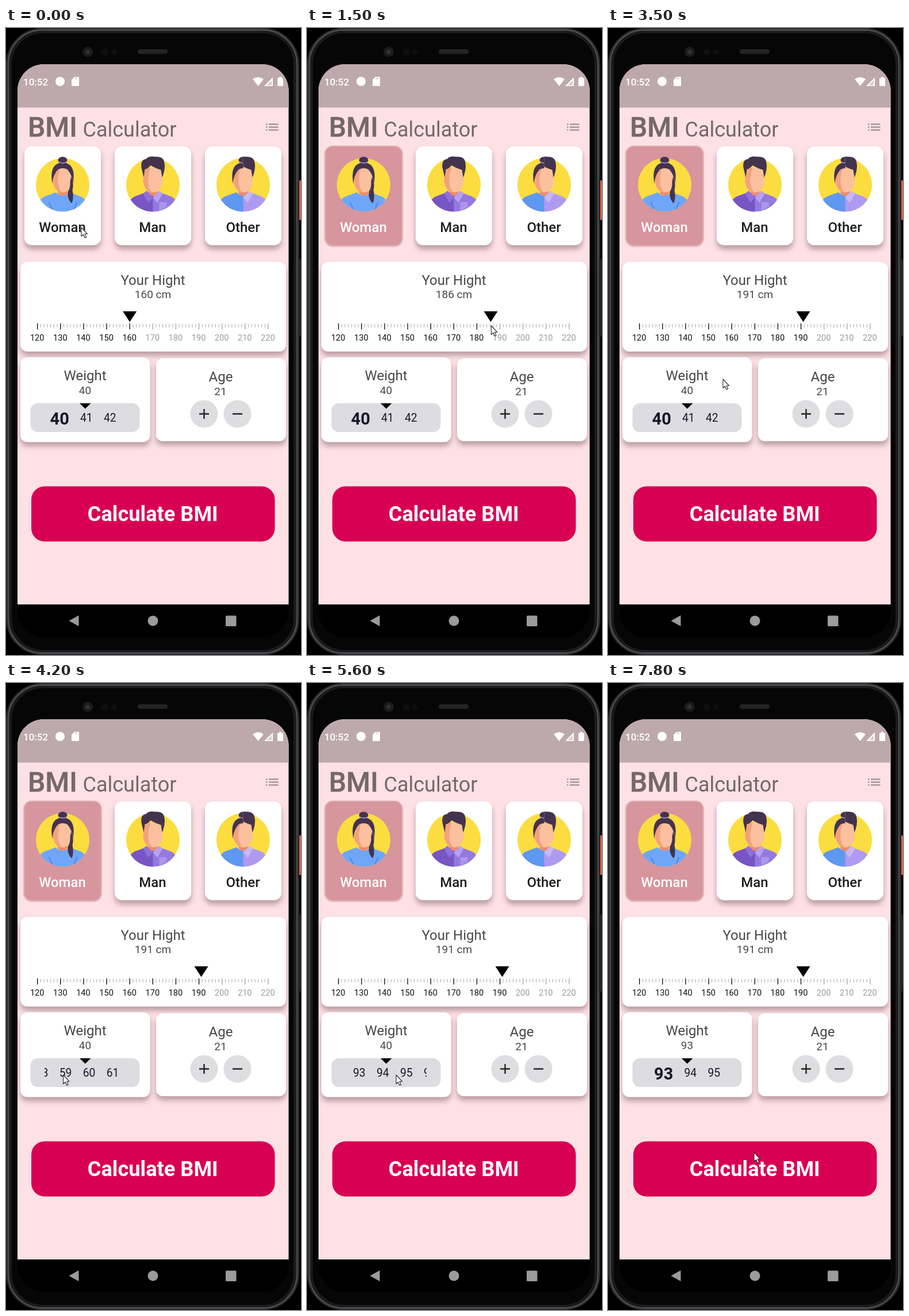
Recreate the animation shown at these times as an HTML page. Size 513 by 1091 pixels, loop 8 s.

```html
<!DOCTYPE html>
<html lang="en">
<head>
<meta charset="utf-8">
<title>BMI Calculator</title>
<style>
  html, body { margin: 0; width: 513px; height: 1091px; overflow: hidden; background: #000; }
  svg { display: block; font-family: Roboto, sans-serif; }
  .mid { text-anchor: middle; }
  .card { fill: #fff; filter: drop-shadow(0 7px 5px rgba(70, 35, 45, .36)); }
  .card.on { fill: #d7959d; stroke: #dda3aa; stroke-width: 2; filter: drop-shadow(0 1px 1.5px rgba(75, 35, 45, .35)); }
  .name { font-size: 24px; font-weight: 500; fill: #1e1e1e; }
  .name.on { fill: #fff; }
  .head { font-size: 24px; fill: #484848; }
  .num { font-size: 19px; fill: #484848; }
  .axis { font-size: 14.6px; }
  .item { font-size: 19.3px; fill: #16172a; }
  .item.on { font-size: 29px; font-weight: 700; }
</style>
</head>
<body>
<svg width="513" height="1091" viewBox="0 0 513 1091">
  <defs>
    <clipPath id="disc"><circle r="46.5"/></clipPath>
    <clipPath id="left"><rect x="-47" y="-55" width="47" height="110"/></clipPath>
    <clipPath id="right"><rect y="-55" width="47" height="110"/></clipPath>
    <clipPath id="list"><rect x="67" y="653" width="141" height="50"/></clipPath>
    <clipPath id="screen"><rect x="20" y="63" width="471.5" height="997" rx="46"/></clipPath>

    <path id="shirt" clip-path="url(#disc)" d="M-47 50Q-44 25-31 20L-12 13Q0 24 12 13L31 20Q44 25 47 50Z"/>
    <g id="face">
      <path d="M-8 4V15Q0 23 8 15V4Z" fill="#ed8c6c"/>
      <path d="M-16-22Q0-40 16-22L17-5Q14 10 3 13H-3Q-14 10-17-5Z" fill="#fbc09d"/>
      <path d="M-16-22Q-11-30-4-30Q-9-16-8-4Q-7 8-1 13H-3Q-14 10-17-5Z" fill="#f3a17f"/>
    </g>
    <g id="womanHair" fill="#43334f">
      <ellipse cy="-43" rx="8" ry="6"/>
      <path d="M-18-2Q-24-38 0-39Q24-38 18-2Q17-17 8-27Q0-31-8-27Q-17-17-18-2Z"/>
      <path d="M-7-40Q0-36 7-40" stroke="#9d83d5" stroke-width="2"/>
    </g>
    <path id="manHair" fill="#43334f" d="M-16-13L-20-30Q-22-44-12-45Q-8-51 4-49Q19-50 20-38Q22-26 16-13L14-26Q4-29-4-34Q-9-28-14-27Z"/>
    <path id="collar" d="M11 10L0 22L8 31L17 15Z"/>

    <g id="woman">
      <use href="#shirt" fill="#6fa6fa"/>
      <path d="M-24 30L-18 42M25 30L20 42" stroke="#4a7fda" stroke-width="1.5"/>
      <use href="#face"/><use href="#womanHair"/>
      <path d="M15-15Q20 0 17 9Q20 22 16 32Q8 26 9 12Q14 4 13-6Z" fill="#43334f"/>
    </g>
    <g id="man">
      <use href="#shirt" fill="#9479df"/><use href="#shirt" fill="#7855c4" clip-path="url(#left)"/>
      <path d="M11 30H24V38L11 45Z" fill="#ac96ed"/>
      <use href="#face"/><use href="#manHair"/>
      <use href="#collar" fill="#b7a1f1"/><use href="#collar" fill="#8e70da" transform="scale(-1 1)"/>
    </g>
    <g id="other">
      <use href="#shirt" fill="#b09af0"/><use href="#shirt" fill="#5f98f0" clip-path="url(#left)"/>
      <use href="#face"/><use href="#collar" fill="#c7b8f6"/>
      <use href="#womanHair" clip-path="url(#left)"/><use href="#manHair" clip-path="url(#right)"/>
    </g>
  </defs>

  <!-- phone body -->
  <rect x="505" y="265" width="8" height="69" rx="1.5" fill="#dd604c"/>
  <rect x="505" y="402" width="8" height="135" rx="2" fill="#202022"/>
  <rect x="1" y="1" width="508" height="1089" rx="62" fill="#161617" stroke="#29292b" stroke-width="2"/>
  <rect x="4" y="3.5" width="502" height="1084" rx="59" fill="#060606" stroke="#4b4b4f" stroke-width="3"/>
  <rect x="8" y="7" width="494" height="1077" rx="56" fill="none" stroke="#1b1b1d" stroke-width="4"/>
  <rect x="229" y="37" width="52" height="8" rx="4" fill="#262324"/>
  <circle cx="142" cy="41.5" r="9" fill="#1b1b1d"/>
  <circle cx="142" cy="41.5" r="4" fill="#303035"/>
  <g fill="#0e0e0f"><circle cx="172" cy="42" r="6"/><circle cx="188" cy="42" r="5"/></g>

  <!-- screen -->
  <g clip-path="url(#screen)">
    <rect x="20" y="63" width="472" height="997"/>
    <rect x="20" y="63" width="472" height="940" fill="#fde1e5"/>
    <rect x="20" y="63" width="472" height="75.5" fill="#bda9ab"/>
  </g>
  <g fill="#fff">
    <text x="30" y="99.5" font-size="17" font-weight="500">10:52</text>
    <circle cx="94" cy="93" r="8"/>
    <path d="M119 85H126Q127 85 127 86V100Q127 101 126 101H115Q114 101 114 100V90Z"/>
    <path d="M429 89Q438.500 82 448 89L438.500 101Z"/>
    <path d="M464 86V101H449Z" fill-opacity=".4"/>
    <path d="M464 86V101H449ZM462 91L453.500 99.500H462Z" fill-rule="evenodd"/>
    <path d="M475 85H479V87H482V101H472V87H475Z"/>
  </g>
  <path d="M120 87.500H125" stroke="#bda9ab" stroke-width="3" stroke-dasharray="1 1.500"/>
  <g fill="#746869">
    <text x="38" y="188.7" font-size="48" font-weight="500" stroke="#746869" stroke-width=".5">BMI</text>
    <text x="133.500" y="188.7" font-size="36">Calculator</text>
  </g>
  <g id="menu" stroke="#93878a" stroke-width="2.2" stroke-dasharray="2.5 2.5 20"></g>

  <g id="people"></g>

  <rect class="card" x="25" y="407" width="462" height="156" rx="12"/>
  <text class="head mid" x="255.5" y="447">Your Hight</text>
  <text class="num mid" x="255.5" y="470.3" id="height"></text>
  <g id="scale"></g>
  <path id="pin" d="M-12 493H12L0 511.500Z"/>

  <rect class="card" x="25" y="573" width="225.5" height="147.5" rx="12"/>
  <text class="head mid" x="137.5" y="613.3">Weight</text>
  <text class="num mid" x="137.5" y="637.2" id="weight"></text>
  <rect x="42.5" y="653" width="190" height="50" rx="13" fill="#dddce0"/>
  <g id="items" clip-path="url(#list)"></g>
  <path d="M128 653H147.500L137.750 662.500Z"/>

  <rect class="card" x="261" y="574.5" width="226" height="144.5" rx="12"/>
  <text class="head mid" x="373.5" y="615.3">Age</text>
  <text class="num mid" x="373" y="639">21</text>
  <g fill="#dedde0"><circle cx="344.5" cy="671.5" r="24"/><circle cx="402.5" cy="671.5" r="24"/></g>
  <path d="M336 671.500H353M344.500 663V680M394 671.500H411" stroke="#232323" stroke-width="2.4"/>

  <rect x="44" y="797.5" width="423.5" height="96" rx="23" fill="#d80052"/>
  <text class="mid" x="255.2" y="858.3" font-size="36.2" font-weight="700" fill="#fff">Calculate BMI</text>

  <g fill="#9b9b9b">
    <path d="M109.500 1031.500L126.500 1022V1041Z"/>
    <circle cx="255.5" cy="1031.5" r="9"/>
    <rect x="382" y="1022.5" width="18.5" height="18.5" rx="1.5"/>
  </g>
  <path id="mouse" d="M0 0V15.500L3.500 12.300L6 18L8.600 16.900L6.100 11.300H10.600Z" fill="#fff" stroke="#25252c" stroke-width="1.1" stroke-linejoin="round"/>
</svg>
<script>
const $ = id => document.getElementById(id);
const STEP = 41, PICK = 7200;

function add(parent, tag, attrs, text = '') {
  const el = document.createElementNS('http://www.w3.org/2000/svg', tag);
  for (const k in attrs) el.setAttribute(k, attrs[k]);
  el.textContent = text;
  parent.appendChild(el);
  return el;
}

const scaleX = v => 54.7 + (v - 120) * 4.012;
const part = (t, from, to) => Math.min(1, Math.max(0, (t - from) / (to - from)));
const ease = (t, from, to) => { const p = part(t, from, to); return p * (2 - p); };

// The pointer drags the height, then flings the weight list twice.
const heightAt = t => Math.round(160 + 26 * ease(t, 1000, 1500) + 3 * ease(t, 1500, 1700)
  + 3 * ease(t, 2000, 2400) - ease(t, 2600, 2800));
const scrollAt = t => 1270.5 * ease(t, 3900, 4700) + 910.5 * ease(t, 4800, 5600);
const swipe = (t, from, to) => 60 * Math.sin(Math.PI * part(t, from, to));

function mouseAt(t) {
  let x = 131, y = 347;
  const go = (from, to, tx, ty) => {
    const p = ease(t, from, to);
    x += (tx - x) * p;
    y += (ty - y) * p;
  };
  go(400, 1000, 216, 518);
  x += scaleX(heightAt(t)) - scaleX(160);
  go(2900, 3500, 200, 611);
  go(3600, 3900, 155, 682);
  x -= swipe(t, 3900, 4700) + swipe(t, 4800, 5600);
  go(6200, 6700, 98, 673);
  go(PICK, 7800, 254, 817);
  return [x, y];
}

for (let y = 167.5; y < 180; y += 5) add($('menu'), 'path', { d: `M452 ${y}H473.5` });

['Woman', 'Man', 'Other'].forEach((name, i) => {
  const x = 32 + 157 * i, g = $('people');
  add(g, 'rect', { class: 'card', x, y: 206, width: 133, height: 172, rx: 13 });
  const pic = add(g, 'g', { transform: `translate(${x + 66.5} 273)` });
  add(pic, 'circle', { r: 46.5, fill: '#fbdd40' });
  add(pic, 'use', { href: '#' + name.toLowerCase() });
  add(g, 'text', { class: 'name mid', x: x + 66, y: 355 }, name);
});
const picked = [document.querySelector('.card'), document.querySelector('.name')];

const marks = [];
for (let v = 120; v <= 220; v += 10) {
  const x = scaleX(v);
  const tick = add($('scale'), 'path', { d: `M${x} 514V524.5`, 'stroke-width': 1.4 });
  const label = add($('scale'), 'text', { class: 'axis mid', x: x - .5, y: 543.5 }, v);
  marks.push({ v, tick, label });
  for (let k = 1; k < 7 && v < 220; k++)
    add($('scale'), 'path', { d: `M${scaleX(v + k * 10 / 7)} 515V521`, stroke: '#a9a9a9' });
}

const items = Array.from({ length: 6 }, () => add($('items'), 'text', {}));

function drawList(selected, scroll) {
  const first = Math.max(40, 39 + Math.floor((scroll - 11) / STEP));
  items.forEach((el, k) => {
    const n = first + k, on = n === selected;
    el.textContent = n;
    el.setAttribute('class', on ? 'item on' : 'item');
    el.setAttribute('x', 76.5 + STEP * (n - 40) + (n > selected ? 11.5 : 0) - scroll);
    el.setAttribute('y', on ? 690 : 685);
  });
}

function draw(t) {
  const tall = heightAt(t), done = t >= PICK, heavy = done ? 93 : 40;
  picked.forEach(el => el.classList.toggle('on', t >= 100));
  $('height').textContent = tall + ' cm';
  $('weight').textContent = heavy;
  $('pin').setAttribute('transform', `translate(${scaleX(tall)})`);
  marks.forEach(({ v, tick, label }) => {
    tick.setAttribute('stroke', v <= tall ? '#111' : '#a9a9a9');
    label.setAttribute('fill', v <= tall ? '#111' : '#9c9c9c');
  });
  // A picked row is wider, so the rows after it sit further right.
  drawList(heavy, scrollAt(t) - (done ? 11.5 : 0));
  $('mouse').setAttribute('transform', `translate(${mouseAt(t)})`);
}

// The picture advances in 100 ms steps.
const start = performance.now();
function loop() {
  const t = (performance.now() - start) % 8000;
  draw(Math.floor(t / 100) * 100);
  requestAnimationFrame(loop);
}
loop();
</script>
</body>
</html>
```
